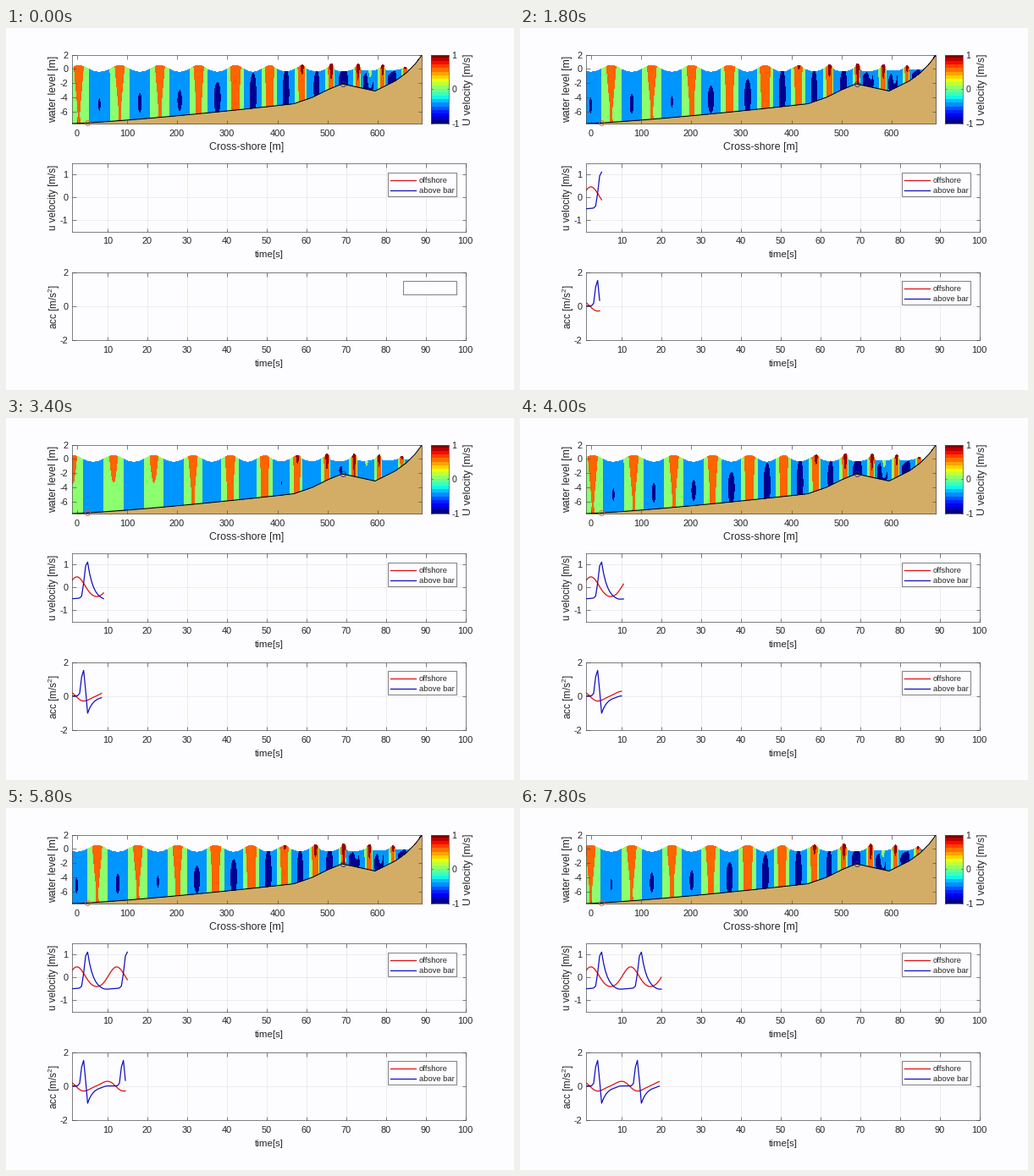
A matplotlib script for the animation above (8 s loop, 600 by 428 pixels).

```python
import numpy as np
import matplotlib.pyplot as plt
from matplotlib.animation import FuncAnimation
from matplotlib.patches import Rectangle

W, H, DPI = 600, 428, 100
PX = 72 / DPI                     # points per pixel
FRAMES, STEP, PERIOD = 40, 0.5, 10
PAPER, INK, EDGE, GRID = "#fdfcfe", "#262626", "#4c4c4c", "#e6e6e8"
RED, BLUE = "#dc1010", "#1010c0"
PEAK, FLOOR = 1.115, .51          # extremes of the velocity above the bar

plt.rcParams.update({
    "font.family": "Liberation Sans",
    "mathtext.fontset": "custom",
    "mathtext.rm": "Liberation Sans",
    "axes.unicode_minus": False,
    "axes.linewidth": 0.5,
    "axes.edgecolor": EDGE,
})


def wrap(phase):
    return np.mod(phase + PERIOD / 2, PERIOD) - PERIOD / 2


def swell(phase):
    """Nearly sinusoidal deep-water wave, crest 1 and trough -0.85."""
    a = 2 * np.pi * phase / PERIOD
    return .925 * np.cos(a) + .087 * np.cos(2 * a) - .012


def breaker(phase):
    """Steep front, then a slow exponential fall."""
    p = wrap(phase)
    front = -.44 + .014 * p + (PEAK + .44) / (1 + np.exp(-5 * (p + .93)))
    back = np.maximum(-.6 + (PEAK + .6) * np.exp(-p / 1.45), -FLOOR)
    return np.where(p < 0, front, back)


def offshore_speed(t):
    return .47 * swell(t - 2.3)


def bar_speed(t):
    return breaker(t - 5)


# --- sea state, in stage pixels ------------------------------------------
x = np.linspace(78, 492, 620)
s = np.linspace(0, 1, 31)[:, None]     # 0 at the bed, 1 at the surface

slope = 113 - 19 * ((x - 78) / 222) ** 1.25
beach = np.interp(x, [340, 362, 380, 397, 404, 436, 460, 473, 483, 492],
                  [89.6, 82, 73, 66, 67.5, 74.5, 62.5, 53, 43, 31])
bed = np.where(x < 340, slope, beach)

# Time at which one crest passes each x
crest = np.polyfit([83.5, 132, 179.5, 268.5, 348, 398, 443, 470],
                   [0, 10, 20, 40, 60, 75, 90, 100], 4)
arrival = np.polyval(crest, x)

near_bar = np.exp(-((x - 398) / 40) ** 2)
crest_amp = (.465 + .6 * ((np.clip(x, 150, 398) - 150) / 250) ** 2
             - .0025 * np.maximum(x - 398, 0))
trough_amp = (.457 + .083 * np.clip((x - 180) / 110, 0, 1)
              + .01 * np.cos(2 * np.pi * (x - 145) / 90)
              + .03 * np.exp(-((x - 391) / 13) ** 2))
height = (.5 + .25 * near_bar) * np.clip((495 - x) / 40, 0, 1)
peaked = np.clip((x - 290) / 108, 0, 1)
crest_depth = 1 + .55 * (s - .15) ** 2
trough_depth = 1 - (1 - .65 * np.clip((x - 230) / 70, 0, 1)) * (s - .35) ** 2


def sea(t):
    """Velocity grid and the pixel height of each grid point."""
    phase = wrap(t - arrival)
    shape = (1 - peaked) * swell(phase) + peaked * breaker(phase) / PEAK
    low = (1 - peaked) * .85 + peaked * FLOOR / PEAK
    trough = np.maximum(-shape / low, 0) ** (1 + peaked)
    u = (crest_amp * crest_depth * np.maximum(shape, 0)
         - trough_amp * trough_depth * trough)
    # short secondary wave behind the bar
    u = u + .75 * s * np.exp(-((x - 430) / 14) ** 2 - (wrap(phase - 5) / .7) ** 2)
    top = np.minimum(48.5 - 8.44 * height * shape, bed)
    return u, bed + s * (top - bed)


# --- figure ----------------------------------------------------------------
fig = plt.figure(figsize=(W / DPI, H / DPI), dpi=DPI, facecolor=PAPER)


def axes_at(x0, y0, x1, y1, xlim, ylim):
    ax = fig.add_axes([x0 / W, 1 - y1 / H, (x1 - x0) / W, (y1 - y0) / H],
                      facecolor=PAPER)
    ax.set(xlim=xlim, ylim=ylim)
    ax.tick_params(direction="in", length=4.5 * PX, width=.5, color=EDGE,
                   labelcolor=INK, labelsize=11 * PX, top=True, right=True)
    ax.tick_params(axis="x", pad=6.5 * PX)
    ax.tick_params(axis="y", pad=4 * PX)
    return ax


sea_ax = axes_at(77.6, 31.5, 491, 113, (77.6, 491), (113, 31.5))
xs = np.arange(0, 601, 100)
sea_ax.set_xticks(83.7 + .592 * xs, [str(v) for v in xs])
ys = np.arange(2, -7, -2)
sea_ax.set_yticks(48.4 - 8.44 * ys, [str(v) for v in ys])
sea_ax.set_axisbelow(False)
sea_ax.set_ylim(113, 31.5)
sea_ax.fill_between(x, bed, 120, color="#d3ad66", lw=0, zorder=2)
sea_ax.plot(x, bed, color="black", lw=.8, zorder=3)
for cx, cy, col in ((95.5, 112, "#ff5030"), (398, 66, "#28287a")):
    sea_ax.plot(cx, cy, "o", ms=6 * PX, mfc="none", mec=col, mew=.6,
                zorder=4, clip_on=False)

bar_ax = axes_at(502, 31.5, 522.5, 113, (0, 1), (-1, 1))
bar_ax.imshow(np.linspace(-1, 1, 20)[:, None], cmap="jet", aspect="auto",
              origin="lower", extent=(0, 1, -1, 1), interpolation="nearest")
bar_ax.set_xticks([])
bar_ax.set_yticks([-1, 0, 1], ["-1", "0", "1"])
bar_ax.tick_params(labelleft=False, labelright=True, length=2.5 * PX,
                   labelsize=10.5 * PX)


def time_axes(y0, y1, lim, ticks):
    ax = axes_at(77.6, y0, 542.6, y1, (1, 100), (-lim, lim))
    ax.set_xticks(range(10, 101, 10))
    ax.set_yticks(ticks, [str(v) for v in ticks])
    ax.grid(color=GRID, lw=.5)
    ax.set_axisbelow(True)
    return ax, [ax.plot([], [], color=c, lw=.9)[0] for c in (RED, BLUE)]


u_ax, u_lines = time_axes(160, 240.8, 1.5, [-1, 0, 1])
a_ax, a_lines = time_axes(288.6, 369.2, 2, [-2, 0, 2])

# Overlay in stage pixels for labels and legends
over = fig.add_axes([0, 0, 1, 1], zorder=5)
over.set(xlim=(0, W), ylim=(H, 0))
over.axis("off")


def label(px, py, text, size, rot=0, ha="center", va="center"):
    return over.text(px, py, text, fontsize=size * PX, color=INK, rotation=rot,
                     ha=ha, va=va)


label(284.5, 141, "Cross-shore [m]", 12.4)
label(56, 72, "water level [m]", 12.2, 90)
label(546, 73, "U velocity [m/s]", 12.4, 90)
label(56, 200, "u velocity [m/s]", 11.6, 90)
label(56.5, 329.5, "acc [m/s$^2$]", 11.6, 90)
for y in (268, 396.5):
    label(310.5, y, "time[s]", 11.5)
over.plot([0, W], [427.5, 427.5], color="#b6b6b8", lw=PX)


def box(x0, y0, x1, y1):
    return over.add_patch(Rectangle((x0, y0), x1 - x0, y1 - y0, fc=PAPER,
                                    ec=EDGE, lw=.5))


def legend(y):
    parts = [box(450.6, y, 531.6, y + 28)]
    for dy, text, col in ((8.5, "offshore", RED), (20.5, "above bar", BLUE)):
        parts += over.plot([453.5, 484], [y + dy, y + dy], color=col, lw=.9)
        parts.append(label(487.6, y + dy + .3, text, 9.4, ha="left",
                           va="center_baseline"))
    return parts


legend(171)
full_legend = legend(299)
empty_legend = box(468.6, 299, 531.6, 314.5)

COLOURS = ["#00008f", "#0096ff", "#8cff70", "#ff6400", "#960000"]
water = None


def draw(n):
    global water
    t = STEP * (n + 1)
    u, y = sea(t)
    # the contour step is finer twice in each wave period
    fine = abs((t + 2.5) % 5 - 2.5) < 1
    dark, warm = (.44, .46) if fine else (.545, .5)
    if water is not None:
        water.remove()
    water = sea_ax.contourf(np.broadcast_to(x, u.shape), y, u,
                            levels=[-9, -dark, 0, warm, 1, 9],
                            colors=COLOURS, zorder=1)

    ts = STEP * np.arange(1, n + 2)
    for speed, u_line, a_line in zip((offshore_speed, bar_speed), u_lines, a_lines):
        v = speed(ts)
        u_line.set_data(ts, v)
        a_line.set_data(ts[:-1], np.diff(v) / STEP)
    for part in full_legend:
        part.set_visible(n > 0)
    empty_legend.set_visible(n == 0)
    return []


anim = FuncAnimation(fig, draw, frames=FRAMES, init_func=lambda: [],
                     interval=200, repeat=True, repeat_delay=0, blit=False)
plt.show()
```
